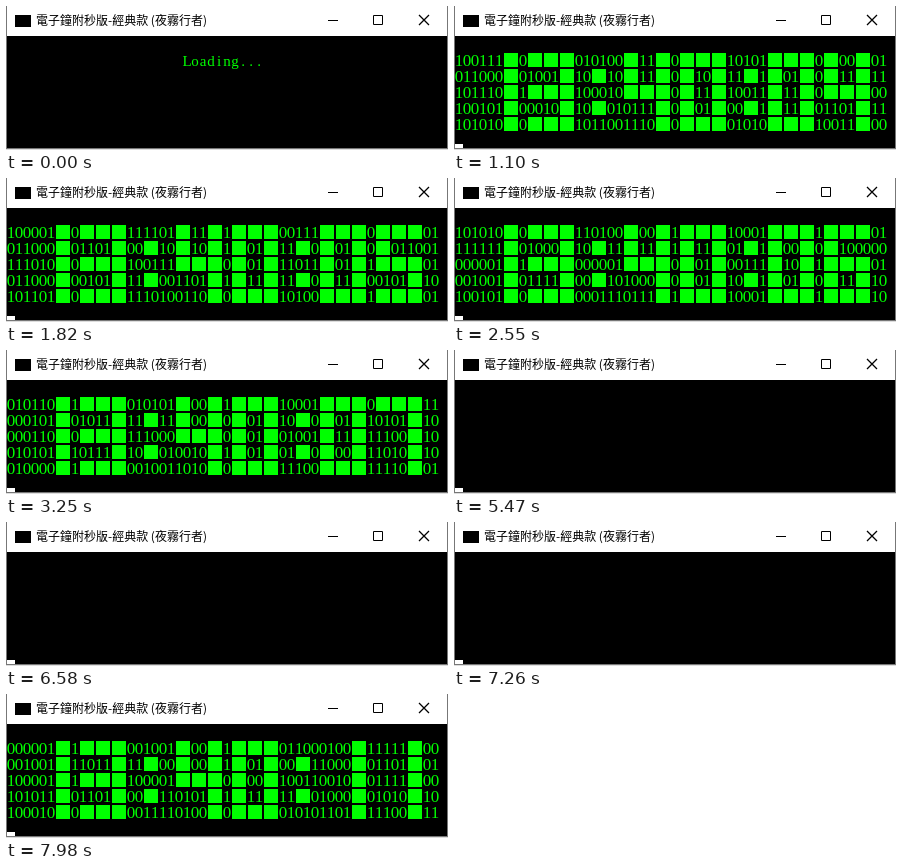
An HTML page that plays this animation: 442 by 144 pixels, repeating every 8 s.

```html
<!DOCTYPE html>
<html lang="zh-Hant">
<meta charset="utf-8">
<title>電子鐘</title>
<style>
  html, body { margin: 0; width: 442px; height: 144px; overflow: hidden; background: #ddd; }
  svg { display: block; }
  .title { font: 12px "Noto Sans CJK TC", "Noto Sans CJK", sans-serif; }
  #screen { font: 17px "Liberation Serif", serif; fill: #0f0; text-anchor: middle; }
  .loading { font-size: 15px; }
</style>
<svg width="442" height="144">
  <path fill="#777" d="M0 0h442v143H0z"/>
  <path fill="#fff" d="M1 0h440v30H1z"/>
  <path d="M1 30h440v112H1z"/>
  <path d="M9 9h16v12H9z"/>
  <text class="title" x="30" y="19">電子鐘附秒版-經典款 (夜霧行者)</text>
  <path fill="none" stroke="#000" d="M322 14.5h10M367.5 9.5h9v9h-9z"/>
  <path stroke="#000" stroke-width="1.3" d="M413 9l10 10m0-10l-10 10"/>
  <g id="screen"></g>
</svg>
<script>
const LOOP = 8000, FIRST = 720, CURSOR_ON = 400;
// Pauses between prints of the clock, in ms
const pauses = [380, 350, 370, 380, 350, 360, 340, 360, 340, 440,
                440, 340, 320, 320, 440, 350, 340, 340, 360, 340];
const ticks = [{ print: FIRST, clear: FIRST - 20 }];
for (const p of pauses) {
  const print = ticks[ticks.length - 1].print + p;
  // A slow print leaves the screen blank for longer
  ticks.push({ print, clear: print - (p > 400 ? 100 : 20) });
}

// Seven-segment digits on a grid of three blocks by five
const segments = 'abcdef bc abged abgcd fgbc afgcd afgedc abc abcdefg abcdfg'.split(' ');
const digitCols = [2, 9, 21, 28, 39, 46], colonCols = [17, 36];

function isLit(digit, row, x) {
  const has = s => segments[digit].includes(s);
  return row % 2 === 0 && has('agd'[row / 2])
    || x !== 1 && (row < 3 && has(x ? 'b' : 'f') || row > 1 && has(x ? 'c' : 'e'));
}

function random(seed) {
  return () => {
    seed = seed + 0x6d2b79f5 | 0;
    let a = Math.imul(seed ^ seed >>> 15, seed | 1);
    a ^= a + Math.imul(a ^ a >>> 7, a | 61);
    return ((a ^ a >>> 14) >>> 0) / 2 ** 32;
  };
}

// The console has cells of 8 by 16 pixels
const cellText = (chars, cols, row, cls = '') =>
  `<text class="${cls}" x="${cols.map(c => 5 + 8 * c).join(' ')}" y="${44 + 16 * row}">${chars}</text>`;
const cursor = row => `<path fill="#fff" d="M1 ${42 + 16 * row}h8v4h-8z"/>`;

function clock(n) {
  const sec = Math.floor((ticks[n].print + 3885) / 1000);
  const digits = [1, 3, 4, 0, Math.floor(sec / 10), sec % 10];
  const rnd = random(n + 1);
  let out = '', blocks = '';
  for (let r = 0; r < 5; r++) {
    const lit = new Set(r % 2 ? colonCols : []);
    digits.forEach((d, i) => {
      for (let x = 0; x < 3; x++) if (isLit(d, r, x)) lit.add(digitCols[i] + 2 * x);
    });
    for (const c of lit) blocks += `M${2 + 8 * c} ${47 + 16 * r}h14v14h-14z`;
    // A block fills two cells; random bits fill the rest
    const free = [...Array(54).keys()].filter(c => !lit.has(c) && !lit.has(c - 1));
    out += cellText(free.map(() => rnd() < 0.5 ? 0 : 1).join(''), free, r + 1);
  }
  return out + `<path d="${blocks}"/>`;
}

const screen = document.getElementById('screen');
const loading = 'Loading...';
let shown;

function frame() {
  const t = performance.now() % LOOP;
  const n = ticks.filter(k => k.clear <= t).length - 1;
  const ready = t >= (n < 0 ? CURSOR_ON : ticks[n].print);
  const state = n + ' ' + ready;
  if (state !== shown) {
    shown = state;
    screen.innerHTML = n < 0
      ? cellText(loading, [...loading].map((_, i) => 22 + i), 1, 'loading') + (ready ? cursor(2) : '')
      : (ready ? clock(n) : '') + cursor(6);
  }
  requestAnimationFrame(frame);
}
frame();
</script>
</html>
```
